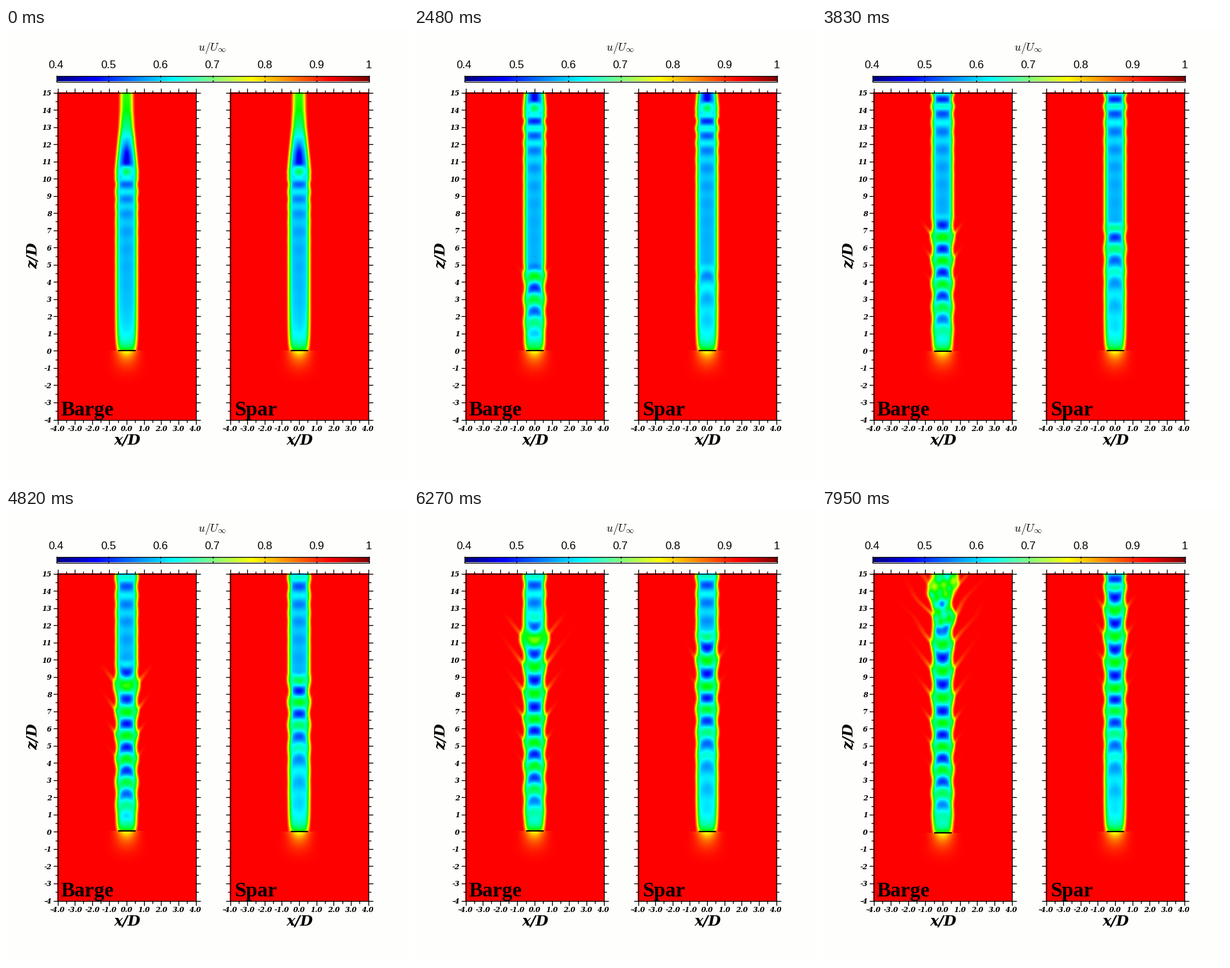
A matplotlib script for the animation above (8 s loop, 620x698 px).

```python
import numpy as np
import matplotlib
import matplotlib.pyplot as plt
from matplotlib.animation import FuncAnimation
from matplotlib.collections import LineCollection

W, H, DPI = 620, 698, 100
PX = 72 / DPI                      # points per pixel
TOP, PW, PH = 99, 214, 505         # panel box, frame lines included
LEFTS = (79, 345)
SX, SZ = (PW - 1) / 8, (PH - 1) / 19   # pixels per diameter
STEP, HOLD, LAST = 20, 10, 40      # ms per frame, frames per snapshot, last snapshot
BG, INK = "#fefefc", "#000000"

matplotlib.rcParams["mathtext.fontset"] = "cm"

X, Z = np.meshgrid((np.arange(PW) + .5 - PW / 2) / SX,
                   15 - np.arange(PH) / SZ)


def ramp(x, a, b):
    t = np.clip((x - a) / (b - a), 0, 1)
    return t * t * (3 - 2 * t)


def bell(x, c, w):
    return np.exp(-((x - c) / w) ** 2)


def rainbow(f):
    """Blue, cyan, green, yellow, red over 0..1; darker blue below 0."""
    rgb = np.stack([4 * f - 2, np.minimum(4 * f, 4 - 4 * f),
                    np.minimum(2 - 4 * f, 1 + 4 * f)], axis=-1)
    return (np.clip(rgb, 0, 1) * 255).astype(np.uint8)


def jet(f):
    rgb = np.stack([1.5 - abs(4 * f - k) for k in (3, 2, 1)], axis=-1)
    return np.clip(rgb, 0, 1)


def heave(s):
    return np.interp(s, [0, 6, 13, 20, 25, 32, 40],
                     [0, -3, 0, -1, 1, 1.5, -2]) / SZ


def wave(z, s, z20, length, bend):
    """Platform wave: +1 in the slow (blue) patches, one of them at z20 for s = 20."""
    z = z - .12 * np.maximum(z - bend, 0)
    return np.cos(2 * np.pi * ((z - z20) / length - .241 * (s - 20)))


def field(s, barge):
    z = Z - (heave(s) if barge else 0)
    drift = np.interp(s, [0, 6, 40], [0, 1.55, 11.9])
    q = Z - drift                  # moves along with the starting vortex

    rough = ramp(Z, 10.5, 13) * ramp(s, 31, 39) if barge else 0 * Z
    x = X - .12 * rough * np.sin(2.6 * Z + .8)
    r = np.abs(x)

    # undisturbed wake and its narrow head
    zp = np.maximum(z, 0)
    core = .17 + .1 * np.exp(-zp / 1.8) + .3 * np.exp(-zp / .35) + .03 * (r / .4) ** 2
    core = core + np.interp(q, [11, 11.6, 12.3, 13, 14, 15.5],
                            [0, 0, .05, .19, .33, .41])
    radius = np.interp(q, [9.8, 10.4, 11, 12, 13, 14], [.56, .59, .54, .44, .35, .31])
    radius = radius - .08 * np.exp(-zp / .6)
    tail = np.maximum(.3 - .12 * (q - 10.8), .08)
    core -= .2 * ramp(q, 10.6, 10.95) * (1 - ramp(q, 11.2, 12.5)) * bell(r, 0, tail)
    core += .25 * bell(q, 10.4, .28) * bell(r, 0, .3)

    if barge:
        shape = 4.6, 1.36, 7
        front = .4 * s - .5
        grow = 1 - np.exp(-(zp / 2.2) ** 1.5)
        flare = ramp(Z, 2.5, 6.5)
    else:
        shape = 5.25, 1.33, 8.5
        front = .35 * s + .1
        grow = .1 * ramp(Z, .5, 3) + .9 * ramp(Z, 2.5, 8.5)
        flare = .7 * ramp(Z, 6.5, 11)
    gate = 1 - ramp(Z, front - .3, front + .6)
    grow = grow * gate
    flare = flare * gate

    # bands trailing the starting vortex
    foot = np.interp(s, [0, 6, 13, 20, 25, 40], [7.95, 9.35, 10.6, 11.6, 12.2, 12])
    bands = np.interp(q, [-7.9, 2.75, 3.82, 4.85, 5.85, 6.9, 7.94, 8.8, 9.65, 10.5],
                      [-10, 0, 1, 2, 3, 4, 5, 6, 7, 8])
    amp = np.minimum(.028 * np.exp((Z - foot) / 1.7), .14) * (1 - ramp(q, 9.8, 10.2))
    amp = amp * (1 - gate)
    c = np.cos(2 * np.pi * bands)
    core -= amp * c * np.exp(-(r / .44) ** 4)
    radius -= .3 * amp * c

    # growing platform wave, its patches arched first up, then down
    arch = np.clip(.8 - .35 * (z - shape[0]), -1, 1)
    c = wave(z + arch * r * r, s, *shape)
    patch = np.exp(-(r / .43) ** (4 - 1.4 * grow)) * (1 - .6 * rough)
    core += .25 * grow * (.33 - c * patch)
    radius -= .05 * grow * wave(z, s, *shape)

    # swollen leading part
    if barge:
        lump = bell(Z, front - 1, .8) * ramp(s, 16, 40)
        core += .17 * lump
        radius += .28 * lump

    core += rough * (.08 + .13 * np.sin(5.1 * Z + 4 * X) * np.cos(3.3 * Z - 7 * X))
    edge = ramp(r, radius - .2, radius + .22)
    f = core + (1 - core) * edge

    # wisps slanting outward
    out = np.maximum(r - .55, 0)
    comb = np.maximum(-wave(z - 1.3 * out, s, *shape), 0) ** 3
    reach = .15 + np.clip(.11 * (Z - 5), 0, .9) * (1 if barge else .25)
    f -= flare * comb * edge * (.33 * np.exp(-out / .14)
                                + .08 * np.exp(-(out / reach) ** 2))

    # slowed flow ahead of the disc
    d = -np.minimum(z, 0)
    slow = .28 * (1 - d / np.sqrt(d * d + .45)) * np.exp(-X ** 2 / (.3 + .4 * d * d))
    slow *= 1 - ramp(np.hypot(X, d), .7, 2.2)
    return np.where(z < 0, 1 - slow, np.minimum(f, 1))


SHOTS = [[rainbow(field(s, b)) for b in (True, False)] for s in range(LAST + 1)]

fig = plt.figure(figsize=(W / DPI, H / DPI), dpi=DPI, facecolor=BG)
ax = fig.add_axes([0, 0, 1, 1])
ax.axis("off")


def picture(data, x, y, w, h):
    return ax.imshow(data, extent=(x, x + w, y + h, y), aspect="auto",
                     interpolation="nearest")


def label(x, y, s, px, family, ha="center", va="center", **kw):
    ax.text(x, y, s, size=px * PX, family=family, ha=ha, va=va, color=INK, **kw)


def axis_text(x, y, s, px, **kw):
    label(x, y, s, px, "DejaVu Serif", weight="bold", style="italic", **kw)


def box(x, y, w, h):
    return [[(x, y), (x + w, y), (x + w, y + h), (x, y + h), (x, y)]]


views = [picture(shot, x, TOP, PW, PH) for shot, x in zip(SHOTS[0], LEFTS)]
picture(jet(np.linspace(0, 1, 482))[None], 78, 74, 482, 8)

lines = box(77.5, 73.5, 482, 9)
for i in range(7):
    x = 77.5 + i * 482 / 6
    lines += [[(x, 73), (x, 76)], [(x, 80), (x, 83)]]
    label(x, 56, "1" if i == 6 else f"0.{i + 4}", 17, "Liberation Sans",
          va="center_baseline")

for x0 in LEFTS:
    left, top = x0 + .5, TOP + .5
    right, bottom = left + PW - 1, top + PH - 1
    lines += box(left, top, PW - 1, PH - 1)
    for i in range(17):
        x, n = left + i * SX / 2, 4 if i % 2 else 7
        lines += [[(x, top), (x, top - n)], [(x, bottom), (x, bottom + n)]]
        if i % 2 == 0:
            axis_text(x, 617.5, f"{i / 2 - 4:.1f}", 10.7)
    for i in range(39):
        y, n = top + i * SZ / 2, 4 if i % 2 else 7
        lines += [[(left, y), (left - n, y)], [(right, y), (right + n, y)]]
        if i % 2 == 0 and x0 == LEFTS[0]:
            axis_text(70.5, y, str(15 - i // 2), 10.7, ha="right",
                      va="center_baseline")
    axis_text(x0 + PW / 2 + .5, 635, "x/D", 22.5)
ax.add_collection(LineCollection(lines, colors=INK, linewidths=1.3 * PX))

axis_text(42, 350.5, "z/D", 22.5, rotation=90)
label(318, 31, r"$u/U_\infty$", 17.5, "DejaVu Serif")
for x, name in zip((84.5, 352.5), ("Barge", "Spar")):
    label(x, 597, name, 32, "Liberation Serif", ha="left", va="baseline",
          weight="bold")

discs = [ax.plot([x + 93.5, x + 120.5], [497, 497], color=INK, lw=2 * PX,
                 solid_capstyle="butt")[0] for x in LEFTS]
ax.set_xlim(0, W)
ax.set_ylim(H, 0)


def update(n):
    s = (n + HOLD - 1) // HOLD
    for view, shot in zip(views, SHOTS[s]):
        view.set_data(shot)
    y = 497 - heave(s) * SZ
    discs[0].set_ydata([y, y])
    return views + discs


anim = FuncAnimation(fig, update, frames=LAST * HOLD, interval=STEP,
                     repeat=True, repeat_delay=0, blit=False)
plt.show()
```
